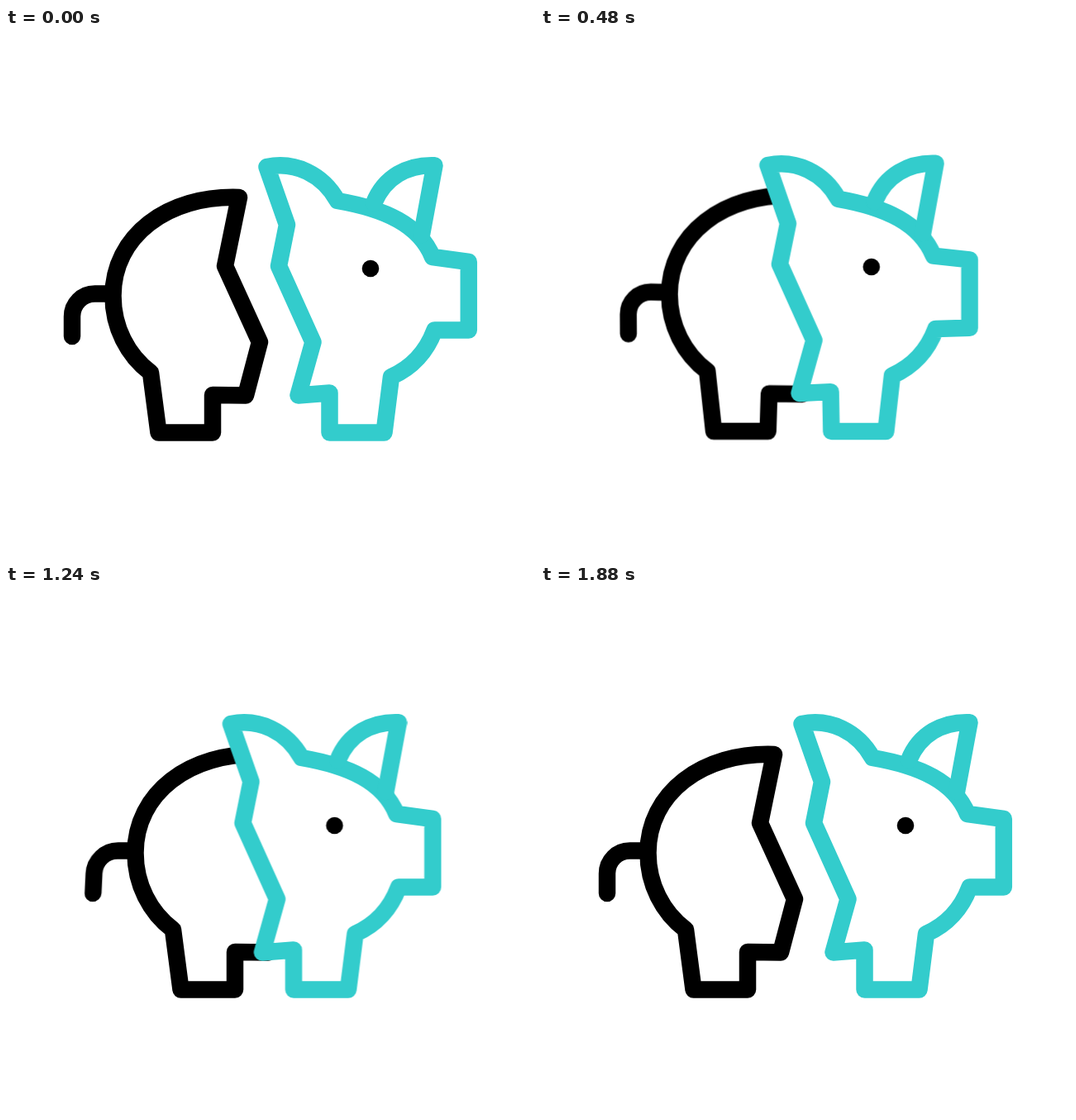
An HTML page without scripts for the animation above (2000 ms loop, 640 px wide and 640 px high).

```html
<!DOCTYPE html>
<html lang="en">
<head>
<meta charset="utf-8">
<title>Piggy bank</title>
<style>
html, body { margin: 0; width: 100%; height: 100%; overflow: hidden; background: #fff; }
svg { display: block; width: 100%; height: 100%; }
path { fill: none; stroke-width: 20.5; stroke-linecap: round; stroke-linejoin: round; }
.fill { fill: #fff; }

/* one curve per kind of motion; each runs from rest (0) to full (1) over the loop */
svg {
  --hop: linear(0 0% 4%, .4 6%, .72 8%, .95 10%, 1.05 12%, .93 15%, .6 18%, .2 22%, 0 26% 74%,
    .13 77%, .5 80%, 1 84%, 1.05 86%, .95 88%, .57 91%, 0 94% 100%);
  --wag: linear(0 0% 34%, .24 38%, 1 43%, -.4 50%, -.55 54%, 0 66% 100%);
  --flick: linear(0 0% 34%, .42 38%, 1 43%, .28 50%, 0 60% 100%);
}
.half { animation: move 2s infinite; }
.half {
  animation-timing-function: linear(0 0% 4%, .41 10%, var(--in) 18%, 1 26% 74%,
    var(--out) 84%, .41 88%, 0 94% 100%);
}
.back { stroke: #000; --move: translateX(27px); --in: .81; --out: .52; }
.front { stroke: #3cc; --move: translateX(-43.5px); --in: .79; --out: .575; }

.hop { animation: move 2s var(--hop) infinite; }
.back .hop { --move: translateY(-24.5px); }
.front .hop { --move: translateY(-21px); }

.bend { animation: bend 2s var(--hop) infinite; }
.tail {
  --move: skewX(15deg);
  transform-origin: 0 338px;
  animation: bend 2s var(--hop) infinite, move 2s var(--wag) infinite;
}
.ear {
  --move: rotate(4.5deg);
  transform-origin: 474px 231px;
  animation: bend 2s var(--hop) infinite, move 2s var(--flick) infinite;
}

@keyframes move { to { transform: var(--move); } }
@keyframes bend { to { d: var(--bent); } }

/* poses in the air, with the limbs lagging behind */
.tail { --bent: path("M129 331C121 329 110 323.5 102.5 323.5C89 323.5 78.5 333 78.5 346L80 367.5"); }
.rump { --bent: path("M282 203.5C195 201 131 257 131 330C131 367 150 401 179 422.5L171.5 497.5H238L252.5 450.5L294 451.5L307 381.5L265 288.5Z"); }
.head { --bent: path("M317 168C351 161 383 176 399.5 207C458 218 499 243 517 283L560 276V359L520.5 371.5C511 397 494 415 467 427.5L467.5 495H402L393 448L356.5 439.5L372.5 378L331 285L341 243Z"); }
.ear { --bent: path("M444 212C457 180 487 160 520.5 162L505 253"); }
</style>
</head>
<body>
<svg viewBox="0 0 640 640">
  <g class="half back"><g class="hop">
    <path class="tail" d="M129 321.5C122 321.5 115 321.5 107.5 321.5C92 321.5 80 334 80 349L80 373"/>
    <path class="rump bend fill" d="M282 205C195 202 129.5 252 129.5 324C129.5 362 147 396 175 417L184.5 489.5H250L250 444L290 444.5L307 380L265 288Z"/>
  </g></g>
  <g class="half front"><g class="hop">
    <path class="head bend fill" d="M315.5 168C350 161 383 177 401 209C459 219 500 238 516 277L559.8 283V365.5L518.5 365.5C509 391 493 410 466 422L457.5 489.5H391.5L391.5 441.5L353.5 444.5L371.5 380L330 288L340 238Z"/>
    <path class="ear" d="M445 212C458 180 486 165 518.5 166.2L503 250"/>
    <circle cx="441" cy="291" r="10.3" stroke="none"/>
  </g></g>
</svg>
</body>
</html>
```
